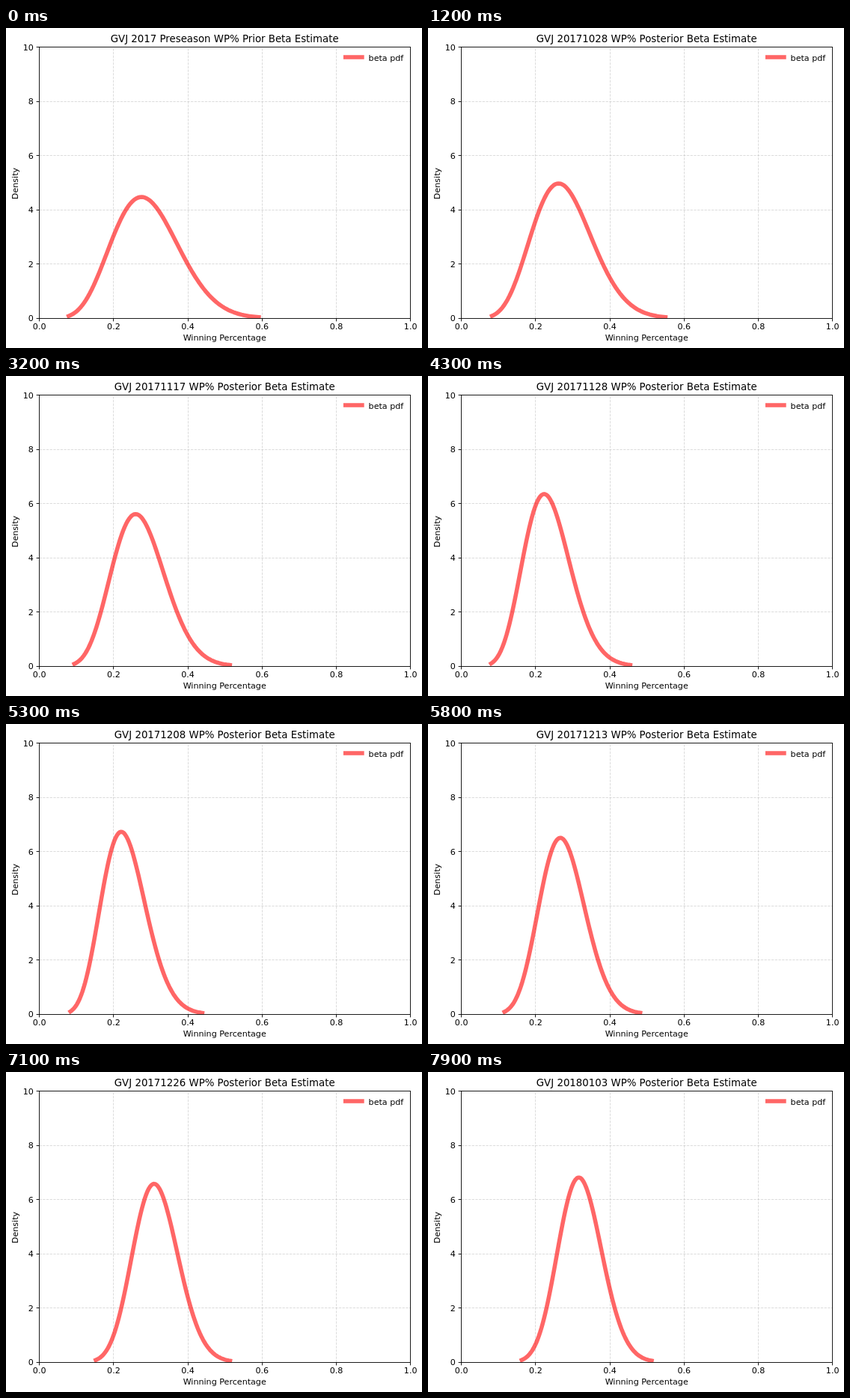
Recreate the animation shown at these times as an HTML page. Size 556 by 428 pixels, loop 8000 ms.

```html
<!DOCTYPE html>
<html lang="en">
<head>
<meta charset="utf-8">
<title>Beta estimate</title>
<style>
  html, body { margin: 0; width: 100%; height: 100%; overflow: hidden; background: #fff; }
  svg { display: block; width: 556px; height: 428px; }
  text { font: 11.11px "DejaVu Sans", sans-serif; fill: #000; text-anchor: middle; }
  #title { font-size: 13.33px; }
  .right { text-anchor: end; }
  .left { text-anchor: start; }
  .grid { stroke: #b0b0b0; stroke-opacity: .5; stroke-width: .89; stroke-dasharray: 3.29 1.42; }
  .axis { stroke: #000; stroke-width: .89; fill: none; }
  .pdf { stroke: #f00; stroke-opacity: .6; stroke-width: 5.56; stroke-linecap: square; stroke-linejoin: round; fill: none; }
</style>
</head>
<body>
<svg viewBox="0 0 556 428">
  <clipPath id="area"><rect x="44.5" y="25.5" width="496" height="363"/></clipPath>
  <g id="grid"></g>
  <path id="curve" class="pdf" clip-path="url(#area)"/>
  <g id="ticks"></g>
  <rect class="axis" x="44.5" y="25.5" width="496" height="363"/>
  <text id="title" x="292.2" y="19"></text>
  <text x="292.2" y="418">Winning Percentage</text>
  <text transform="translate(16 208) rotate(-90)">Density</text>
  <path class="pdf" d="M453.7 39H475.9"/>
  <text class="left" x="484.6" y="44">beta pdf</text>
</svg>
<script>
const FRAME = 100, COUNT = 80, TEAM = 'GVJ';
const PRIOR = { a: 7.52, b: 18.2 };
const LEFT = 44.7, BOTTOM = 388.1;

// Game days, counted from 16 October 2017
const WINS = [10, 18, 32, 53, 54, 56, 58, 60, 63, 65, 71, 72, 74];
const LOSSES = [3, 5, 8, 12, 16, 19, 22, 25, 26, 30, 34, 36, 37, 39, 41, 43, 45,
  46, 49, 51, 66, 68, 76, 77, 79];

const $ = id => document.getElementById(id);
const px = x => LEFT + 496 * x;
const py = d => BOTTOM - 36.24 * d;
const snap = v => Math.floor(v) + .5;

function add(parent, tag, attrs, text = '') {
  const el = document.createElementNS('http://www.w3.org/2000/svg', tag);
  for (const key in attrs) el.setAttribute(key, attrs[key]);
  el.textContent = text;
  $(parent).append(el);
}

function drawAxes() {
  for (let i = 0; i <= 5; i++) {
    const x = snap(px(i / 5)), y = snap(py(i * 2));
    if (i > 0 && i < 5) {
      add('grid', 'path', { class: 'grid', d: `M${x} 388.5V25.5` });
      add('grid', 'path', { class: 'grid', d: `M44.5 ${y}H540.5` });
    }
    add('ticks', 'path', { class: 'axis', d: `M${x} 388.5v3.89M44.5 ${y}h-3.89` });
    add('ticks', 'text', { x: px(i / 5), y: 403 }, (i / 5).toFixed(1));
    add('ticks', 'text', { class: 'right', x: 36.9, y: Math.round(py(i * 2) + 4) }, i * 2);
  }
}

// Density and quantiles of a beta distribution, by numeric integration
function beta(a, b) {
  const steps = 2000;
  const raw = x => x ** (a - 1) * (1 - x) ** (b - 1);
  const cdf = [0];
  for (let i = 0; i < steps; i++) cdf.push(cdf[i] + raw((i + .5) / steps) / steps);
  const total = cdf[steps];
  return {
    pdf: x => raw(x) / total,
    ppf(q) {
      const i = cdf.findIndex(c => c >= q * total);
      return (i - (cdf[i] - q * total) / (cdf[i] - cdf[i - 1])) / steps;
    }
  };
}

function curvePath(a, b) {
  const { pdf, ppf } = beta(a, b);
  const from = ppf(.001), to = ppf(.999);
  const points = Array.from({ length: 100 }, (_, i) => {
    const x = from + (to - from) * i / 99;
    return px(x).toFixed(2) + ' ' + py(pdf(x)).toFixed(2);
  });
  return 'M' + points.join('L');
}

function titleFor(day) {
  if (day === 0) return `${TEAM} 2017 Preseason WP% Prior Beta Estimate`;
  const date = new Date(Date.UTC(2017, 9, 16 + day)).toISOString().slice(0, 10).replace(/-/g, '');
  return `${TEAM} ${date} WP% Posterior Beta Estimate`;
}

const played = (games, day) => games.filter(g => g <= day).length;
let shown = -1;

function show(day) {
  if (day === shown) return;
  shown = day;
  $('title').textContent = titleFor(day);
  $('curve').setAttribute('d', curvePath(PRIOR.a + played(WINS, day), PRIOR.b + played(LOSSES, day)));
}

drawAxes();
show(0);
const start = performance.now();
function tick() {
  show(Math.floor((performance.now() - start) / FRAME) % COUNT);
  requestAnimationFrame(tick);
}
requestAnimationFrame(tick);
</script>
</body>
</html>
```
